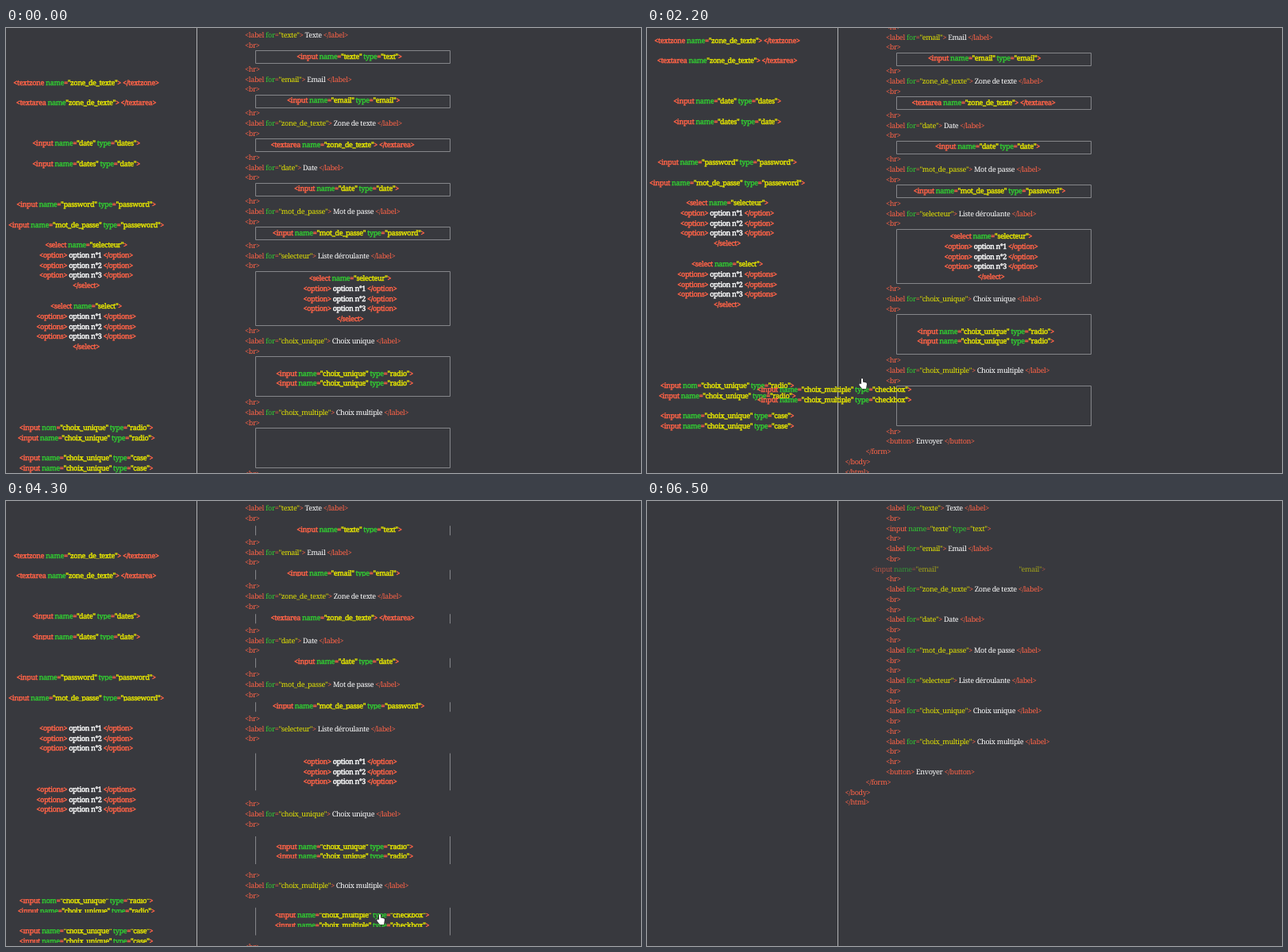
An HTML page with a canvas for the animation above (6.6 s loop, 800 by 560 pixels).

```html
<!DOCTYPE html>
<html lang="fr">
<head>
<meta charset="utf-8">
<style>
html, body { margin: 0; width: 100%; height: 100%; overflow: hidden; background: #38393e; }
canvas { display: block; }
</style>
</head>
<body>
<canvas width="800" height="560"></canvas>
<script>
const ctx = document.querySelector('canvas').getContext('2d');
const LOOP = 6600, STEP = 100, LINE = 12.77;
const COLORS = ['#ff6347', '#e6e600', '#32c832', '#ffffff'];
const TOKEN = /(<\/?\w+|=|>)|("[^"]*")|( (?:name|type|for|nom))|([^<>="]+)/g;

const input = (name, type, attr = 'name') => `<input ${attr}="${name}" type="${type}">`;
const select = (name, tag) => [`<select name="${name}">`,
  ...[1, 2, 3].map(n => `<option> option n°${n} </${tag}>`.replace('<option>', `<${tag}>`)),
  '</select>'];
const twice = line => [line, line];
const checkboxes = twice(input('choix_multiple', 'checkbox'));
const radios = twice(input('choix_unique', 'radio'));

// Form groups: field id, caption, height of the drop box
const groups = [
  ['texte', 'Texte', 17.2], ['email', 'Email', 17.2],
  ['zone_de_texte', 'Zone de texte', 17.2], ['date', 'Date', 17.2],
  ['mot_de_passe', 'Mot de passe', 17.2], ['selecteur', 'Liste déroulante', 69.4],
  ['choix_unique', 'Choix unique', 51.2], ['choix_multiple', 'Choix multiple', 51.2]
];

// Snippets: centre x, y of the first line, lines
const snippets = [
  [101, 68.5, ['<textzone name="zone_de_texte"> </textzone>']],
  [101, 94, ['<textarea name"zone_de_texte"> </textarea>']],
  [101, 145, [input('date', 'dates')]],
  [101, 170.5, [input('dates', 'date')]],
  [101, 222, [input('password', 'password')]],
  [101, 247.5, [input('mot_de_passe', 'passeword')]],
  [101, 273, select('selecteur', 'option')],
  [101, 350, select('select', 'options')],
  [101, 503, [input('choix_unique', 'radio', 'nom'), radios[0]]],
  [101, 541, twice(input('choix_unique', 'case'))],
  [432.5, 36, [input('texte', 'text')]],
  [425, 90.5, [input('email', 'email')]],
  [424, 147, ['<textarea name="zone_de_texte"> </textarea>']],
  [429, 202, [input('date', 'date')]],
  [431.5, 258, [input('mot_de_passe', 'password')]],
  [433.5, 315, select('selecteur', 'option')],
  [426.5, 434.5, radios]
];

const scrollKeys = [[300, 0], [1100, 67], [1500, 67], [2200, 53], [2800, 0]];
const dragKeys = [[1500, 101, 549], [2200, 236, 455], [2850, 437, 522], [3900, 437, 522], [4000, 436, 521]];
const cursorKeys = [[100, 776, 300], [700, 300, 480], [1200, 137, 554], [1500, 137, 554], [2200, 272, 447],
  [2850, 474, 527], [3900, 474, 527], [4000, 472, 526], [4500, 472, 526], [5000, 680, 481], [5400, 690, 504]];
const ARROW = new Path2D('M0 0V11L2.6 8.6 4.2 12.2 5.8 11.5 4.3 8H7.6Z');
const HAND = new Path2D('M3 7V1.2Q3 0 4 0T5 1.2V4.6L8.5 5.2Q10 5.5 10 7L9 13H4L.5 8.5Q0 7 1.2 6.5Z');

const clamp = v => Math.min(1, Math.max(0, v));

function at(keys, t) {
  const next = keys.findIndex(k => k[0] > t);
  if (next === 0) return keys[0].slice(1);
  if (next < 0) return keys[keys.length - 1].slice(1);
  const a = keys[next - 1], b = keys[next], p = (t - a[0]) / (b[0] - a[0]);
  return a.slice(1).map((v, i) => v + (b[i + 1] - v) * p);
}

function code(line, x, y, bold) {
  for (const m of line.matchAll(TOKEN)) {
    ctx.fillStyle = ctx.strokeStyle = COLORS[[1, 2, 3, 4].findIndex(i => m[i])];
    ctx.fillText(m[0], x, y + 3);
    if (bold) ctx.strokeText(m[0], x, y + 3);
    x += ctx.measureText(m[0]).width;
  }
  return x;
}

// Runs draw() inside a band trimmed by the same share at top and bottom
function trimmed(y, h, cut, draw) {
  if (cut >= 0.5) return;
  ctx.save();
  if (cut > 0) {
    ctx.beginPath();
    ctx.rect(0, y + h * cut, 800, h * (1 - 2 * cut));
    ctx.clip();
  }
  draw();
  ctx.restore();
}

function snippet(x, y, lines, cut) {
  trimmed(y - LINE / 2, lines.length * LINE, cut, () => {
    ctx.lineWidth = 0.45;
    lines.forEach((line, i) => code(line, x - ctx.measureText(line).width / 2, y + i * LINE, true));
  });
}

function box(y, h, cut) {
  trimmed(y, h + 1, cut, () => {
    ctx.strokeStyle = '#85868a';
    ctx.lineWidth = 1;
    ctx.strokeRect(314.5, Math.round(y) + 0.5, 245, Math.round(h) - 1);
  });
}

// The two ends of the line slide in before the middle shows
function arrivingInput(name, type, y, p) {
  if (p >= 1) return code(input(name, type), 301, y);
  const head = `<input name="${name}"`, tail = `"${type}">`;
  ctx.globalAlpha = p;
  code(head, 301 - 164 * (1 - p) ** 2.4, y);
  code(tail, 301 + ctx.measureText(head + ' type=').width + 147 * (1 - p), y);
  ctx.globalAlpha = 1;
}

function form(t, cut) {
  let y = 9;
  const row = (line, x = 301) => { code(line, x, y); y += LINE; };
  groups.forEach(([id, caption, height], i) => {
    row(`<label for="${id}"> ${caption} </label>`);
    row('<br>');
    const start = 5600 + i * 600;
    if (cut < 0.5) {
      box(y - LINE / 2, height, cut);
      y += height;
    } else if (t >= start) {
      arrivingInput(id, i ? id : 'text', y, clamp((t - start) / 500));
      y += LINE;
    }
    row('<hr>');
  });
  row('<button> Envoyer </button>');
  row('</form>', 275.5);
  row('</body>', 249.5);
  row('</html>', 249.5);
}

function cursor(t) {
  if (t < 100 || t >= 5500) return;
  const [x, y] = at(cursorKeys, t), hand = t >= 1000 && t < 4500;
  const shape = hand ? HAND : ARROW;
  ctx.save();
  ctx.translate(x - (hand ? 5 : 3), y - 6);
  ctx.lineWidth = 1;
  ctx.strokeStyle = '#222';
  ctx.fillStyle = '#fff';
  ctx.stroke(shape);
  ctx.fill(shape);
  ctx.restore();
}

function draw(t) {
  const [scroll] = at(scrollKeys, t), cut = clamp((t - 4100) / 600) / 2;
  ctx.fillStyle = '#38393e';
  ctx.fillRect(0, 0, 800, 560);
  ctx.fillStyle = '#b4b5b7';
  ctx.fillRect(240, 0, 1, 560);

  ctx.save();
  ctx.translate(0, -scroll);
  form(t, cut);
  for (const [x, y, lines] of snippets) snippet(x, y, lines, cut);
  ctx.restore();

  const [x, y] = t < 1500 ? [101, 616 - scroll] : at(dragKeys, t);
  snippet(x, y, checkboxes, cut);
  cursor(t);
}

ctx.font = '9px "Noto Serif", serif';
ctx.letterSpacing = '-0.33px';
ctx.textRendering = 'geometricPrecision';
ctx.lineJoin = 'round';

const begin = performance.now();
function tick() {
  const t = (performance.now() - begin) % LOOP;
  draw(Math.floor(t / STEP) * STEP);
  requestAnimationFrame(tick);
}
tick();
</script>
</body>
</html>
```
